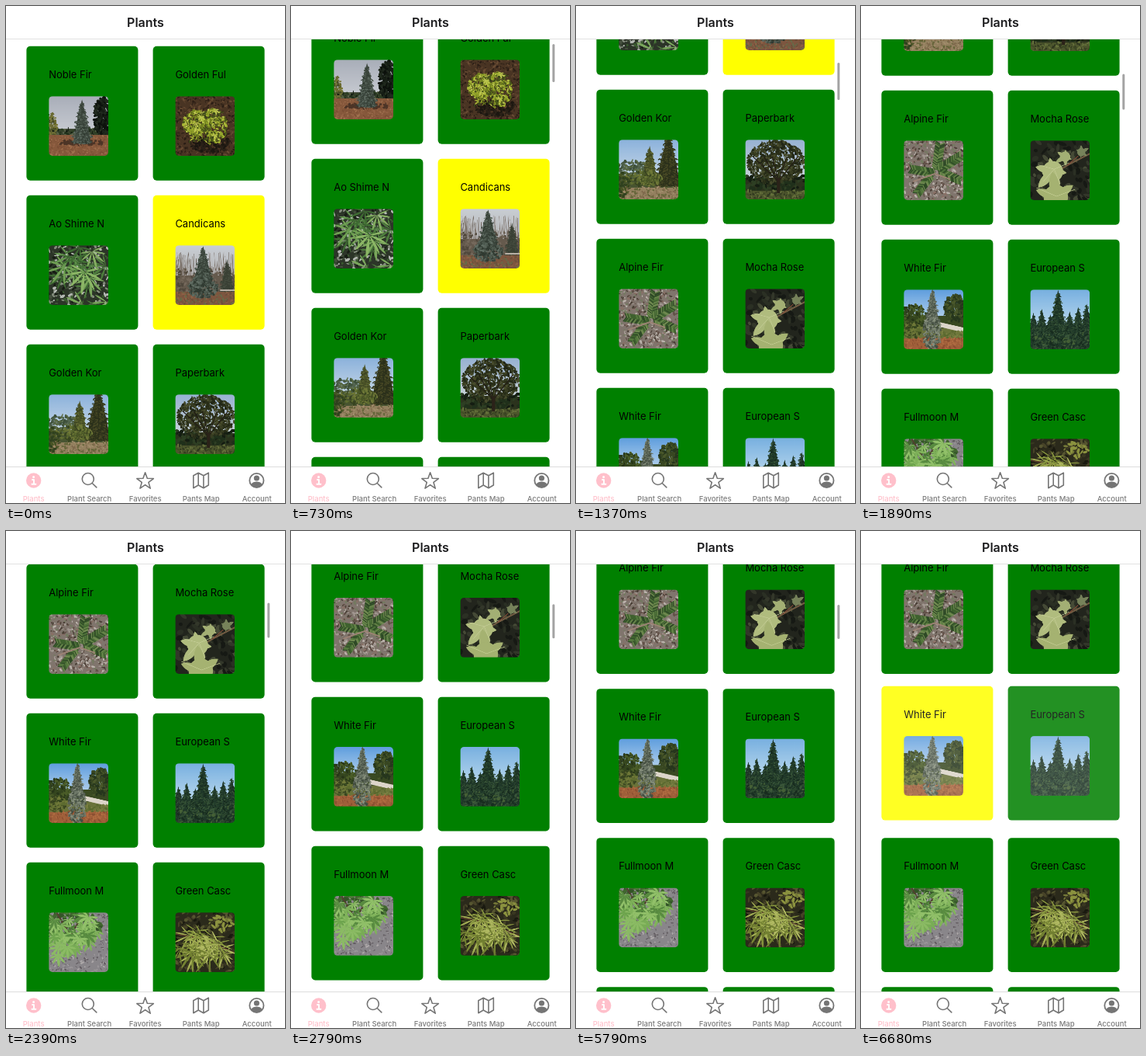
Write an HTML page with a canvas that moves like this. It is 360 px wide and 640 px high and loops after 8000 ms.

```html
<!DOCTYPE html>
<html lang="en">
<head>
<meta charset="utf-8">
<title>Plants</title>
<style>
html, body { margin: 0; width: 100%; height: 100%; overflow: hidden; background: #fff; }
body { position: relative; font-family: Inter, Roboto, sans-serif; }
#list { position: absolute; left: 0; top: 0; width: 320px; transform-origin: 0 0; }
.row { position: absolute; left: 0; width: 320px; height: 180px; }
.card { position: absolute; top: 0; width: 150px; height: 180px; border-radius: 5px; background: #008000; }
.card span { position: absolute; left: 30px; top: 28px; font-size: 13.5px; line-height: 21px; white-space: nowrap; color: #000; }
.card canvas { position: absolute; left: 30px; top: 67px; width: 80px; height: 80px; border-radius: 5px; }
#bar { position: absolute; left: 0; top: 0; width: 3px; border-radius: 2px; background: #a3a3a3; }
header { position: absolute; left: 0; top: 0; width: 360px; height: 42px; background: #fff; border-bottom: 1px solid #e2e2e2;
  font-size: 16px; font-weight: 600; line-height: 42px; text-align: center; color: #1c1c1e; }
nav { position: absolute; left: 0; top: 593px; width: 360px; height: 47px; background: #fff; border-top: 1px solid #dcdcdc; box-sizing: border-box; }
nav span { position: absolute; top: 34px; width: 72px; text-align: center; font-size: 9.5px; line-height: 13px; font-weight: 500; color: #7b7b7b; white-space: nowrap; }
nav svg { position: absolute; left: 0; top: -1px; }
</style>
</head>
<body>
<div id="list"></div>
<div id="bar"></div>
<header>Plants</header>
<nav>
  <svg width="360" height="47" viewBox="0 593 360 47" fill="none" stroke="#757575" stroke-width="1.6" stroke-linejoin="round" stroke-linecap="round">
    <circle cx="35.7" cy="611" r="9.7" fill="#ffc0cb" stroke="none"/>
    <circle cx="35.6" cy="606.4" r="1.5" fill="#fff" stroke="none"/>
    <path d="M34 610h2v5.6M33.4 615.8h5" stroke="#fff" stroke-width="1.9"/>
    <circle cx="105.8" cy="609" r="7.5"/>
    <path d="M111.5 614.7l5.3 5.2"/>
    <path id="star"/>
    <path d="M241.8 604.8l6.4-3.6 6.7 3.6 6.4-3.6v15.8l-6.4 3.7-6.7-3.7-6.4 3.7zM248.2 601.2v15.8M254.9 604.8v15.9"/>
    <circle cx="323.4" cy="611" r="9.1" stroke-width="1.8"/>
    <circle cx="323.4" cy="608" r="3.6" fill="#757575" stroke="none"/>
    <path d="M316.4 616.2c1.4-2.9 3.9-3.6 7-3.6s5.6.7 7 3.6a8.6 8.6 0 0 1-14 0z" fill="#757575" stroke="none"/>
  </svg>
</nav>
<script>
const $ = id => document.getElementById(id);
const add = (parent, tag, cls) => {
  const el = parent.appendChild(document.createElement(tag));
  if (cls) el.className = cls;
  return el;
};

['Plants', 'Plant Search', 'Favorites', 'Pants Map', 'Account'].forEach((label, i) => {
  const el = add(document.querySelector('nav'), 'span');
  el.textContent = label;
  el.style.left = i * 72 - 0.3 + 'px';
  if (!i) el.style.color = '#ffc0cb';
});
$('star').setAttribute('d', 'M' + Array.from({ length: 10 }, (_, i) => {
  const a = i * Math.PI / 5, r = i % 2 ? 4.6 : 11.3;
  return (179.6 + r * Math.sin(a)).toFixed(2) + ' ' + (612 - r * Math.cos(a)).toFixed(2);
}).join('L') + 'Z');

// Painting kit for the thumbnails, 77 units square
let c, seed;
const rnd = () => (seed = (seed * 16807) % 2147483647) / 2147483647;
const pick = list => list[Math.floor(rnd() * list.length)];
const rect = (col, x, y, w, h) => { c.fillStyle = col; c.fillRect(x, y, w, h); };
const disc = (col, x, y, rx, ry = rx, turn = 0) => {
  c.fillStyle = col;
  c.beginPath();
  c.ellipse(x, y, rx, ry, turn, 0, 7);
  c.fill();
};
const sky = (a, b) => {
  const g = c.createLinearGradient(0, 0, 0, 60);
  g.addColorStop(0, a);
  g.addColorStop(1, b);
  rect(g, 0, 0, 77, 77);
};
const line = (col, w, ...p) => {
  c.strokeStyle = col;
  c.lineWidth = w;
  c.beginPath();
  c.moveTo(p[0], p[1]);
  for (let i = 2; i < p.length; i += 2) c.lineTo(p[i], p[i + 1]);
  c.stroke();
};
const specks = (cols, n, x, y, w, h, s) => {
  for (let i = 0; i < n; i++)
    disc(pick(cols), x + rnd() * w, y + rnd() * h, s * (0.5 + rnd()), s * (0.3 + rnd() * 0.5), rnd() * 3);
};
const blob = (cols, n, x, y, rx, ry, s) => {
  for (let i = 0; i < n; i++) {
    const a = rnd() * 6.283, r = Math.sqrt(rnd());
    specks(cols, 1, x + Math.cos(a) * r * rx, y + Math.sin(a) * r * ry, 0, 0, s);
  }
};
const fir = (x, top, base, w, cols) => {
  const h = base - top, half = f => w / 2 * f ** 0.8;
  c.fillStyle = cols[0];
  c.beginPath();
  c.moveTo(x, top - 2);
  c.lineTo(x + half(0.5) * 0.8, top + h / 2);
  c.lineTo(x + half(1) * 0.8, base);
  c.lineTo(x - half(1) * 0.8, base);
  c.lineTo(x - half(0.5) * 0.8, top + h / 2);
  c.fill();
  for (let i = 0; i < h * w / 3; i++) {
    const f = Math.sqrt(rnd()), px = x + (rnd() * 2 - 1) * half(f) * (0.8 + 0.2 * Math.sin(f * h)), py = top + f * h;
    line(pick(cols), 1.1, px, py, px + (px < x ? -2 : 2), py + 1);
  }
};
const leaf = (x, y, r, dir, lobes, spread, fat, col) => {
  c.fillStyle = col;
  for (let i = 0; i < lobes; i++) {
    const k = i / (lobes - 1) * 2 - 1, a = dir + k * spread / 2, len = r * (1 - 0.35 * Math.abs(k));
    const mid = s => [x + Math.cos(a + s * fat) * len * 0.65, y + Math.sin(a + s * fat) * len * 0.65];
    const tip = [x + Math.cos(a) * len, y + Math.sin(a) * len];
    c.beginPath();
    c.moveTo(x, y);
    c.quadraticCurveTo(...mid(-1), ...tip);
    c.quadraticCurveTo(...mid(1), x, y);
    c.fill();
  }
};
const leaves = (n, r, lobes, fat, cols, x = 0, y = 0, w = 77, h = 77) => {
  for (let i = 0; i < n; i++)
    leaf(x + rnd() * w, y + rnd() * h, r * (0.7 + rnd() * 0.6), 1.2 + rnd() * 1.4, lobes, 3.8, fat, pick(cols));
};

const deep = ['#141d12', '#20301b', '#2e3f24'];
const spruce = ['#3c463d', '#4d594f', '#5f6c62', '#303a31'];
const moss = ['#4a5727', '#5e6c30', '#384420', '#6f7838'];
const soil = ['#7b4f35', '#946346', '#84573b', '#a0714f'];
const lime = ['#8f9f28', '#a9b636', '#748320', '#bcc650'];

const plants = [
  ['Noble Fir', () => {
    sky('#a9aeb9', '#d0d3d8');
    rect('#39432e', 0, 42, 77, 10);
    specks(deep.concat('#59624a'), 120, 0, 42, 77, 8, 2);
    blob(['#6b6b35', '#777634', '#454b24'], 130, 3, 40, 7, 18, 2);
    blob(['#0d120d', '#161e15', '#20291e'], 220, 70, 27, 11, 25, 3);
    rect('#87593c', 0, 50, 77, 27);
    specks(soil, 350, 0, 51, 77, 26, 1.4);
    specks(['#4d3527'], 80, 15, 57, 55, 6, 2);
    fir(43, 6, 61, 29, spruce);
  }],
  ['Golden Ful', () => {
    rect('#493423', 0, 0, 77, 77);
    specks(['#36271b', '#583f2b', '#684b33', '#2a1d15'], 500, 0, 0, 77, 77, 1.6);
    blob(['#1c1711', '#2a2118'], 150, 45, 60, 25, 13, 2.5);
    blob(lime.concat('#4b581b'), 190, 29, 35, 19, 17, 2);
    blob(lime.concat('#4b581b'), 220, 48, 39, 19, 23, 2);
    leaves(30, 6, 5, 0.5, lime, 15, 17, 44, 40);
    specks(['#4f5b1c', '#39431a'], 70, 18, 20, 44, 40, 1.6);
  }],
  ['Ao Shime N', () => {
    rect('#2c3528', 0, 0, 77, 77);
    specks(['#171d14', '#434f3c', '#b3b8b2', '#838c7c', '#3a5a2f'], 260, 0, 0, 77, 77, 2.5);
    leaves(14, 24, 7, 0.2, ['#4d7c3d', '#64964e', '#7aa65c', '#3e6b32']);
    leaf(46, 34, 31, 1.7, 7, 3.8, 0.2, '#8bb565');
    leaf(20, 27, 27, 2.2, 7, 3.8, 0.2, '#709f53');
    leaf(56, 8, 24, 1.3, 7, 3.4, 0.2, '#83ac60');
  }],
  ['Candicans', () => {
    sky('#c9ced4', '#aaa7a5');
    for (let i = 0; i < 90; i++) {
      const x = rnd() * 77, y = 8 + rnd() * 25;
      line(pick(['#7d736b', '#938a83', '#675b52']), 0.5, x, 50, x + rnd() * 10 - 5, y);
    }
    rect('#655a4d', 0, 39, 77, 24);
    specks(['#655a4d', '#50483d', '#75695c'], 260, 0, 30, 77, 30, 2);
    fir(67, 20, 60, 20, ['#3a4035', '#464d40']);
    rect('#7d563f', 0, 60, 77, 17);
    specks(['#8f6147', '#6d503c', '#676b49'], 200, 0, 60, 77, 17, 1.5);
    fir(36, 3, 52, 32, spruce);
    blob(spruce, 260, 36, 55, 19, 13, 2);
    rect('#b9b1a7', 58, 57, 19, 2);
  }],
  ['Golden Kor', () => {
    sky('#8cb2dc', '#d4e0e9');
    rect('#485432', 0, 46, 77, 18);
    blob(['#52644e', '#3e503a', '#5a6a45'], 170, 18, 39, 25, 12, 2.3);
    fir(64, -8, 60, 40, ['#2b301b', '#3a3e20', '#4b4b27']);
    fir(40, 10, 58, 27, ['#4a5228', '#626a34', '#3b4322']);
    blob(moss, 170, 32, 50, 25, 10, 2);
    rect('#93805f', 0, 62, 77, 15);
    specks(['#a38e6d', '#806b4e', '#646539'], 170, 0, 61, 77, 16, 1.6);
    blob(['#30411f', '#465323'], 90, 5, 60, 9, 18, 2);
  }],
  ['Paperbark', () => {
    sky('#98b2d3', '#cfd7d6');
    rect('#2b331d', 0, 50, 77, 18);
    specks(deep, 130, 0, 46, 77, 18, 3);
    rect('#4d562d', 0, 66, 77, 11);
    specks(['#65703b', '#3c4724', '#313820'], 120, 0, 65, 77, 12, 1.6);
    blob(['#2a2f19', '#383d22', '#484c2c', '#222717'], 700, 40, 29, 37, 28, 2.3);
    specks(['#9cadb8'], 45, 5, 4, 68, 38, 0.8);
    [10, 24, 35, 54, 68].forEach(x => line('#241e16', 1.2, 43, 54, x, 22));
    line('#2b2219', 4, 43, 50, 43, 69);
  }],
  ['Alpine Fir', () => {
    rect('#80756d', 0, 0, 77, 77);
    specks(['#a0968f', '#625148', '#897066', '#bab2ab', '#4b4037', '#737b60'], 600, 0, 0, 77, 77, 1.8);
    const sprig = (x, y, dx, dy) => {
      line('#3d5b30', 7, x, y, x + dx * 0.9, y + dy * 0.9);
      for (let i = 0; i < 50; i++) {
        const k = i / 50, s = i % 2 ? 1 : -1, px = x + dx * k, py = y + dy * k;
        line(pick(['#3f622f', '#55783e', '#2f4a27', '#708a50']), 1.3, px, py, px + s * dy * 0.18 + dx * 0.1, py - s * dx * 0.18 + dy * 0.1);
      }
    };
    [[42, 38, 5, -34], [44, 38, 30, -18], [40, 42, -31, -5], [36, 44, -19, 25], [46, 40, 28, 12]].forEach(p => sprig(...p));
    line('#9b8274', 2, 12, 53, 40, 43, 60, 50);
  }],
  ['Mocha Rose', () => {
    rect('#22251d', 0, 0, 77, 77);
    specks(['#161914', '#33372a', '#454a36', '#2b3024'], 110, 0, 0, 77, 77, 4.5);
    line('#715b42', 2, 28, 44, 48, 32, 77, 17);
    line('#8a4f3b', 1, 48, 32, 62, 20);
    const broad = (x, y, r, dir, col) => {
      leaf(x, y, r, dir, 5, 4.4, 0.65, col);
      disc(col, x, y, r * 0.48);
    };
    broad(45, 21, 14, 2.6, '#a3af74');
    broad(66, 15, 11, -0.5, '#76825a');
    broad(29, 40, 28, 2.3, '#b0bc7e');
    broad(33, 73, 33, -1.7, '#a5b271');
    [2.3, 1.2, 3.4, -0.4].forEach(a => line('#c8d09a', 0.6, 31, 37, 31 + 21 * Math.cos(a), 37 + 21 * Math.sin(a)));
    line('#c3cd92', 0.7, 8, 61, 34, 72, 58, 63);
  }],
  ['White Fir', () => {
    sky('#5f9ede', '#e4eef4');
    rect('#3a4a22', 0, 34, 77, 18);
    blob(['#35461f', '#4a5c28', '#283619'], 220, 12, 38, 20, 18, 2.5);
    blob(['#26361d', '#384722', '#4a582b'], 260, 66, 25, 14, 18, 2.5);
    rect('#6a733a', 0, 50, 77, 27);
    line('#dcd5c9', 6, 46, 45, 77, 52);
    specks(['#7c8044', '#5a692f', '#6d773b'], 110, 45, 54, 32, 11, 1.8);
    rect('#9f5f3a', 0, 63, 77, 14);
    specks(['#b06c42', '#8b4f32', '#9f603a'], 190, 0, 62, 77, 15, 1.5);
    blob(moss, 130, 10, 52, 13, 11, 2);
    const frost = ['#566053', '#6f7969', '#858e7b', '#434d40'];
    fir(37, 0, 45, 22, frost);
    blob(frost, 260, 37, 55, 12, 24, 1.8);
  }],
  ['European S', () => {
    sky('#78b0e0', '#c8e1f0');
    const pine = ['#20382a', '#2c472f', '#395539', '#182c1f'];
    rect(pine[0], 0, 47, 77, 30);
    [4, 15, 26, 51, 62, 73].forEach((x, i) => fir(x, [32, 27, 34, 30, 24, 20][i], 78, 28, pine));
    fir(36, 2, 68, 30, pine);
    specks(pine.concat('#456036'), 160, 0, 55, 77, 22, 2);
  }],
  ['Fullmoon M', () => {
    rect('#89868a', 0, 0, 77, 77);
    specks(['#9b979a', '#777276', '#625c61', '#aea9aa'], 420, 0, 0, 77, 77, 1.4);
    blob(['#41662f', '#4c7838', '#345528'], 200, 28, 18, 40, 20, 3);
    line('#51402f', 2, 10, 0, 28, 30, 40, 10);
    leaves(30, 15, 7, 0.36, ['#6ba24c', '#80b35b', '#588b40', '#91c069'], 0, 3, 62, 36);
    leaves(9, 13, 7, 0.36, ['#79ad56', '#8bbb64'], 2, 40, 34, 16);
  }],
  ['Green Casc', () => {
    rect('#2b2a1b', 0, 0, 77, 77);
    specks(['#19190f', '#393721', '#474328', '#565530'], 190, 0, 0, 77, 77, 3);
    blob(['#747838', '#8b923f'], 22, 60, 14, 17, 10, 3);
    line('#5a3d2b', 1.5, 0, 28, 35, 34, 77, 52);
    leaves(26, 24, 7, 0.15, ['#88963f', '#a2ad53', '#717f31', '#b0b962'], 0, 22, 64, 32);
  }],
  ['Grey Alder', () => sky('#7fa0b8', '#45602f')],
  ['Vine Maple', () => sky('#93a35c', '#3c5529')]
];

// The list is laid out in points and shown at SCALE
const SCALE = 0.96, rows = [], cards = [];
plants.forEach(([name, paint], i) => {
  const r = i >> 1;
  if (!rows[r]) {
    rows[r] = add($('list'), 'div', 'row');
    rows[r].style.top = 54 + r * 200 + 'px';
  }
  const card = cards[i] = add(rows[r], 'div', 'card');
  card.style.left = i % 2 * 170 + 'px';
  add(card, 'span').textContent = name;
  const cv = add(card, 'canvas');
  cv.width = cv.height = 160;
  c = cv.getContext('2d');
  c.scale(160 / 77, 160 / 77);
  seed = 977 + i * 7919;
  paint();
});
cards[3].style.background = '#ff0';

// Screen refresh times; the picture holds still between them
const ticks = [0, 500, 610, 730, 850, 950, 1130, 1250, 1370, 1530, 1640, 1740];
for (let t = 1890; t <= 3190; t += 100) ticks.push(t);
ticks.push(5790, 5910, 6040, 6470, 6570, 6680);

const lerp = (pts, x, col = 1) => {
  let i = 1;
  while (i < pts.length - 1 && x > pts[i][0]) i++;
  const a = pts[i - 1], b = pts[i];
  return a[col] + (b[col] - a[col]) * (x - a[0]) / (b[0] - a[0]);
};
const drag = [[500, 4], [730, 47], [950, 100], [1130, 146]];
const thumb = [[0, 45, 49], [47, 49, 49], [328, 73, 48], [585, 92.5, 45], [617, 95, 44]];

const scrollAt = t => {
  if (t < 500) return 0;
  if (t < 1130) return lerp(drag, t);
  if (t < 5790) return 623.4 - 295.4 * Math.exp((1370 - t) / 500);
  return 616.7;
};

function draw(now) {
  const time = now % 8000;
  const t = ticks.filter(k => k <= time).pop();
  const s = scrollAt(t);
  $('list').style.transform = `translate(26.4px, ${-s}px) scale(${SCALE})`;

  const bar = $('bar').style;
  bar.opacity = t < 500 || t >= 6040 ? 0 : t >= 5910 ? 0.5 : 1;
  bar.transform = `translate(337.3px, ${lerp(thumb, s)}px)`;
  bar.height = lerp(thumb, s, 2) + 'px';

  const press = t < 6470 ? 0 : (t - 6370) / 310;
  rows[4].style.transform = `translateY(${-3.5 * press}px)`;
  rows[4].style.opacity = 1 - 0.14 * press;
  cards[8].style.background = t >= 6570 ? '#ff0' : '';
}

const start = performance.now();
const loop = () => {
  draw(performance.now() - start);
  requestAnimationFrame(loop);
};
loop();
</script>
</body>
</html>
```
